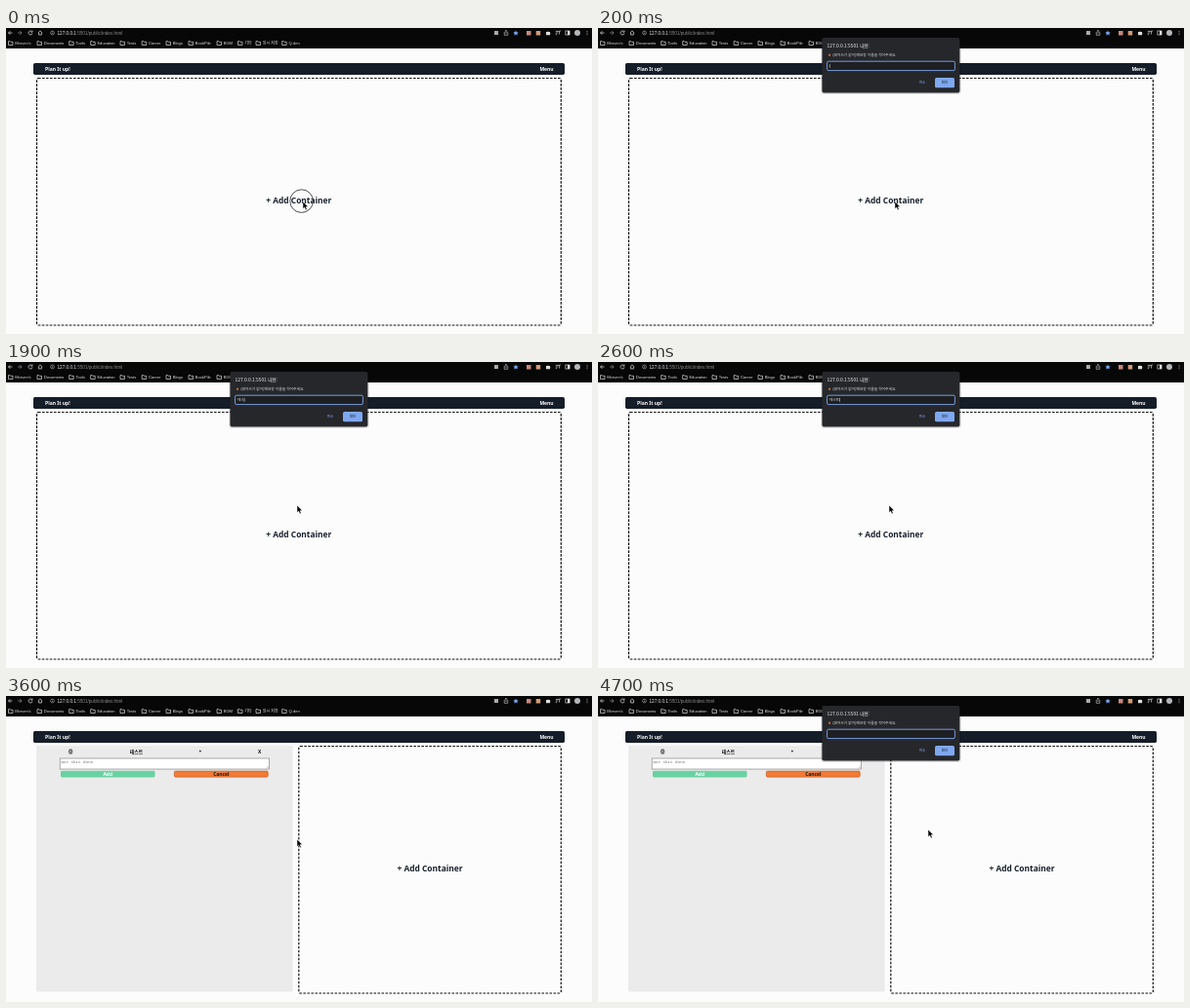
Write an HTML page that moves like this. It is 600 px wide and 314 px high and loops after 5 s.

```html
<!DOCTYPE html>
<html lang="ko">
<head>
<meta charset="utf-8">
<style>
html, body { margin: 0; width: 100%; height: 100%; overflow: hidden; background: #fcfcfc; }
svg { position: absolute; left: 0; top: 0; width: 600px; height: 314px; }
text { font-family: "Noto Sans", "Noto Sans CJK KR", "Noto Sans CJK", sans-serif; white-space: pre; }
.ui text { font-family: "Liberation Sans", "Noto Sans CJK KR", "Noto Sans CJK", sans-serif; }
.cjk text { font-family: "Noto Sans CJK KR", "Noto Sans CJK", sans-serif; }
.bold { font-weight: 700; }
.mid { text-anchor: middle; }
.line { fill: none; stroke: #d5d5d5; stroke-width: .75; }
#dialog { transform-origin: 300px 38px; }
</style>
</head>
<body>
<svg viewBox="0 0 600 314">
  <g class="ui">
    <rect width="600" height="21" fill="#070707"/>
    <g class="line">
      <path d="M6.5 5H2.5M4.3 3.2L2.5 5L4.3 6.8"/>
      <path d="M12 5H16M14.2 3.2L16 5L14.2 6.8" stroke="#888"/>
      <path d="M26.6 3.7A2 2 0 1 0 27 5.4M27 2.6V4.2H25.4"/>
      <path d="M32.8 5L35 2.9L37.2 5M33.6 4.8V7H36.4V4.8"/>
      <circle cx="47.5" cy="5" r="1.9" stroke-width=".5"/>
      <path d="M47.5 4.7V6.1M47.5 3.7V4.2" stroke-width=".5"/>
      <path d="M510.7 4.3H510.2V7.3H513.8V4.3H513.3M512 6V2.4M510.9 3.4L512 2.3L513.1 3.4" stroke-width=".6"/>
      <path d="M562.8 3.4H566M562.8 5H565M562.8 6.6H564M566.6 6.5V3H568"/>
      <rect x="572.9" y="3" width="4.2" height="4" stroke-width=".7"/>
    </g>
    <text x="52.5" y="6.7" font-size="4.65" fill="#eee">127.0.0.1<tspan fill="#8b8b8b">:5501/public/index.html</tspan></text>
    <rect x="500" y="3" width="4" height="4" fill="#aaa"/>
    <path d="M522 2.4L522.8 4.2L524.7 4.4L523.3 5.7L523.7 7.5L522 6.6L520.3 7.5L520.7 5.7L519.3 4.4L521.2 4.2Z" fill="#7baaf7"/>
    <rect x="533" y="3" width="4.5" height="4.5" fill="#c9877d"/>
    <rect x="542.7" y="3" width="4.5" height="4.5" fill="#d39a72"/>
    <path d="M553 4H554.3A.8 .8 0 0 1 555.8 4H557V5A.8 .8 0 0 1 557 6.4V7.3H553Z" fill="#ddd"/>
    <rect x="575" y="3" width="2" height="4" fill="#ddd"/>
    <circle cx="585" cy="5" r="3" fill="#b4b7ba"/>
    <path d="M595 3v.8M595 4.7v.8M595 6.4v.8" stroke="#ddd" stroke-width=".8"/>
    <g id="marks" font-size="4.1" fill="#e2e2e2"></g>
  </g>

  <rect x="28" y="36" width="544" height="12" rx="1.8" fill="#151d29"/>
  <g class="bold" font-size="5" fill="#fff">
    <text x="40" y="43.6">Plan It up!</text>
    <text x="553.5" y="43.6" class="mid">Menu</text>
  </g>

  <g id="box">
    <rect x="31" y="51" width="262.5" height="252.5" fill="#ebebeb"/>
    <g class="line" style="stroke:#222;stroke-width:.7">
      <circle cx="66.2" cy="57" r="1.8"/>
      <circle cx="66.2" cy="57" r=".5"/>
      <path d="M64.4 54.8H68M64.4 59.2H68" stroke-width=".4"/>
    </g>
    <g class="mid bold" font-size="4.9" fill="#111">
      <text x="133.5" y="58.7">테스트</text>
      <text x="199" y="58.7">+</text>
      <text x="259.7" y="58.7">X</text>
    </g>
    <rect x="55.2" y="64" width="214.2" height="11" fill="#fff" stroke="#777" stroke-width=".6"/>
    <path d="M266.3 74.3L268.7 71.9M267.7 74.3L268.7 73.3" stroke="#777" stroke-width=".4"/>
    <text x="56.5" y="68.6" font-size="4.2" fill="#707070" style="font-family:'Liberation Mono',monospace">Get shit done</text>
    <rect x="56" y="76.8" width="96.5" height="6.6" rx="1.4" fill="#69d2a3"/>
    <rect x="172.3" y="77" width="96" height="6.2" rx="1.4" fill="#f27b35" stroke="#b85b25" stroke-width=".6"/>
    <g class="mid" font-size="4.9" font-weight="600">
      <text x="104.2" y="81.8" fill="#fff">Add</text>
      <text x="220.3" y="81.8" fill="#111">Cancel</text>
    </g>
  </g>

  <rect id="frame" y="51.5" height="253.5" rx="1.5" fill="none" stroke="#111" stroke-width="1.2" stroke-dasharray="2.6 1.4"/>
  <text id="add" y="180.2" class="mid" font-size="8.4" font-weight="600" fill="#18202c">+ Add Container</text>
</svg>

<svg id="dialog" class="cjk" viewBox="0 0 600 314">
  <rect x="228.3" y="10" width="143.4" height="58" rx="3" fill="#000" opacity=".13"/>
  <rect x="229.4" y="10" width="141" height="56.6" rx="2" fill="#25272b"/>
  <text x="234.5" y="19.7" font-size="4.85" fill="#eee">127.0.0.1:5501 내용:</text>
  <circle cx="237" cy="27.8" r="1.2" fill="#b5673c"/>
  <text x="240.3" y="29.2" font-size="3.74" fill="#ddd">(띄어쓰기 없이)메모장 이름을 적어주세요.</text>
  <rect x="234.6" y="34.2" width="130.8" height="9.4" rx="1.4" fill="#1d1f23" stroke="#81a9ee" stroke-width=".9"/>
  <text id="typed" x="237" y="40.3" font-size="3.7" fill="#ddd"></text>
  <path id="caret" d="M0 36.8V41" stroke="#eee" stroke-width=".5"/>
  <rect x="345" y="51" width="20" height="10.2" rx="1.5" fill="#7fa8ef"/>
  <g class="mid" font-size="3.6">
    <text x="332" y="57.4" fill="#84acf2">취소</text>
    <text x="355" y="57.4" fill="#17202e">확인</text>
  </g>
</svg>

<svg viewBox="0 0 600 314">
  <g id="pointer">
    <circle id="click" cx="-1.4" cy="-.4" r="11.8" fill="none" stroke="#222" stroke-width=".8"/>
    <path d="M0 0V7.6L1.7 6.1L2.9 8.8L4.3 8.2L3.1 5.6H5.4Z" fill="#000" stroke="#fff" stroke-width=".5"/>
  </g>
</svg>

<script>
const $ = id => document.getElementById(id);
const show = (el, on) => el.style.visibility = on ? "visible" : "hidden";

const bookmarks = [
  [2.5, "Morven's"], [32, "Documents"], [64.7, "Tools"], [86.7, "Education"],
  [117, "Tests"], [139.2, "Career"], [164, "Blogs"], [187, "BookPile"],
  [216, "BGM"], [237.5, "기타"], [256, "임시 저장"], [282.7, "Q-den"]
];
$("marks").innerHTML = bookmarks.map(([x, name]) =>
  `<path d="M${x} 13.6h1.7l.6 .7h2.2v3.2h-4.5z" fill="none" stroke="#ddd" stroke-width=".7"/>
   <text x="${x + 6.7}" y="17">${name}</text>`).join("");

// Value of the last [time, value] step reached
const at = (steps, t) => steps.filter(s => s[0] <= t).pop()[1];

const typing = [[0, ""], [1000, "ㅌ"], [1200, "테"], [1500, "텟"], [1700, "테스"],
  [2000, "테슽"], [2200, "테스트"], [3200, ""]];
const fade = [[0, 0], [100, .5], [200, 1], [3000, .24], [3100, .08], [3200, 0], [4300, .5], [4400, 1]];
const blink = [[0, 1], [800, 0], [1000, 1], [2400, 0], [2600, 1], [4700, 0]];

function ease(t, start, end) {
  const k = Math.min(1, Math.max(0, (t - start) / (end - start)));
  return k * k * (3 - 2 * k);
}

function draw(t) {
  const added = t >= 3000;
  show($("box"), added);
  const left = added ? 299.8 : 31.5;
  $("frame").setAttribute("x", left);
  $("frame").setAttribute("width", 568.3 - left);
  $("add").setAttribute("x", added ? 434 : 299.8);

  const alpha = at(fade, t);
  $("dialog").style.opacity = alpha;
  $("dialog").style.transform = alpha < 1
    ? "translateY(-3px) perspective(180px) rotateX(30deg) scale(.93)" : "none";
  $("typed").textContent = at(typing, t);
  $("caret").setAttribute("transform", `translate(${237.3 + $("typed").getComputedTextLength()})`);
  show($("caret"), at(blink, t));

  const a = ease(t, 200, 500), b = ease(t, 3600, 4000);
  $("pointer").setAttribute("transform", `translate(${304 - 6 * a + 40 * b} ${178 - 31 * a - 10 * b})`);
  show($("click"), t < 200 || t >= 4200 && t < 4400);
}

const start = performance.now();
function tick() {
  draw(Math.floor((performance.now() - start) % 5000 / 100) * 100);
  requestAnimationFrame(tick);
}
tick();
</script>
</body>
</html>
```
